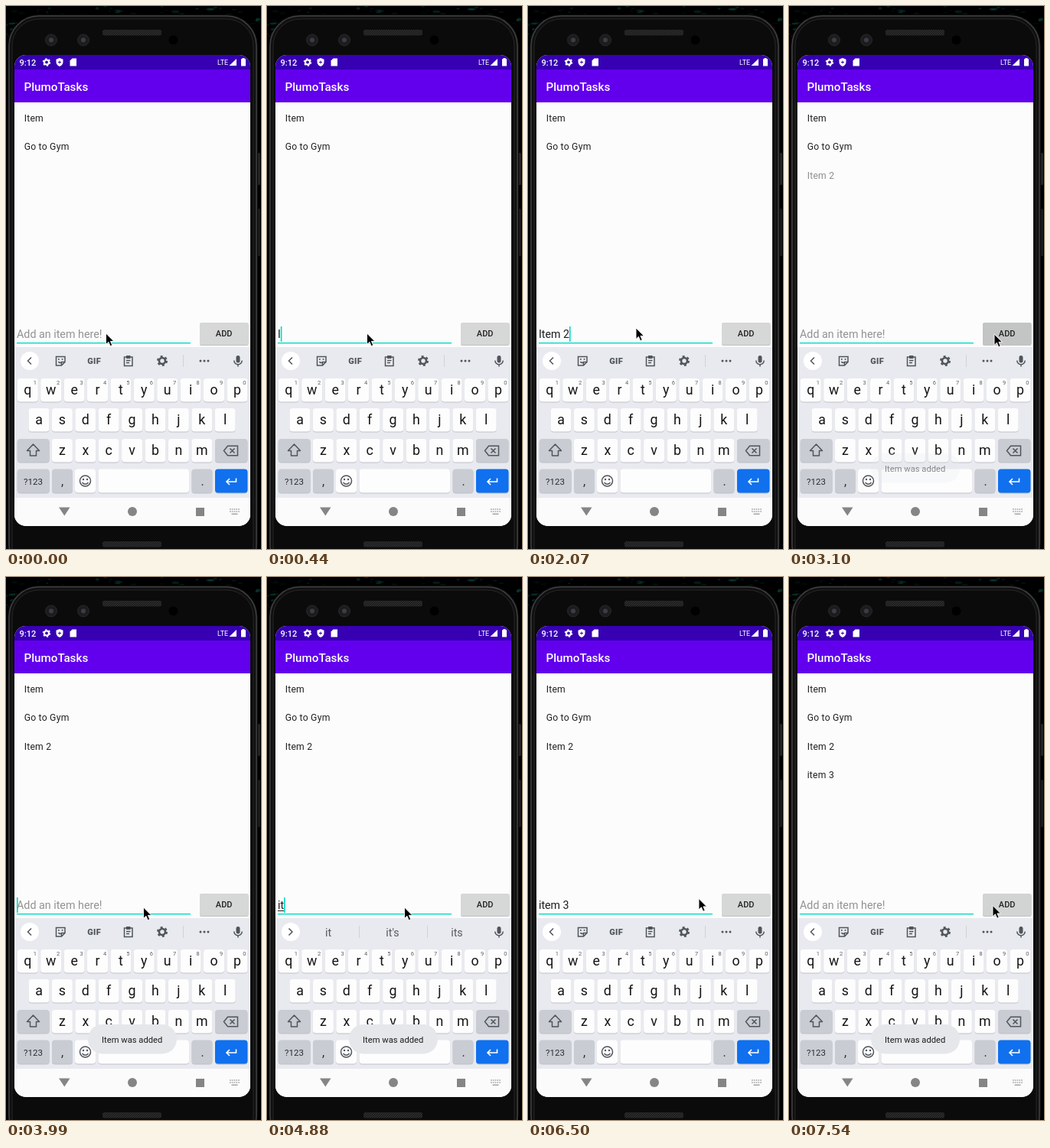
Animation of 333 by 710 pixels, one loop 7.99 s. Source, as an HTML page:

```html
<!DOCTYPE html>
<html lang="en">
<head>
<meta charset="utf-8">
<title>To-do list demo</title>
<style>
  html, body { margin: 0; width: 100%; height: 100%; overflow: hidden; background: #000; }
  svg { display: block; width: 333px; height: 710px; font-family: Roboto, sans-serif; }
  text { white-space: pre; }
  .mid { text-anchor: middle; }
  .medium { font-weight: 500; }
  .icon { fill: none; stroke: #50555b; stroke-width: 1.5; }
  .solid { fill: #50555b; }
  .white { fill: #fff; }
</style>
</head>
<body>
<svg viewBox="0 0 333 710">
  <defs>
    <clipPath id="screen"><rect x="11" y="64" width="308" height="616" rx="15"/></clipPath>
    <pattern id="mesh" width="3" height="3" patternUnits="userSpaceOnUse">
      <rect width="3" height="3" fill="#2b2b2b"/><path d="M0 3L3 0" stroke="#171717"/>
    </pattern>
  </defs>
  <rect width="333" height="710"/>
  <g id="specks"></g>

  <!-- phone body -->
  <rect x="328" y="192" width="4" height="42" rx="1.5" fill="#242424"/>
  <rect x="328" y="265" width="4" height="62" rx="1.5" fill="#1b1b1b"/>
  <rect x="2" y="11" width="327" height="730" rx="41" fill="#0a0a0a"/>
  <rect x="4" y="13" width="323" height="730" rx="39" fill="#101010" stroke="#414141" stroke-width="1.5"/>
  <rect x="8" y="17" width="315" height="730" rx="35" fill="#0b0b0b" stroke="#272727"/>
  <rect x="126" y="31" width="77" height="7.5" rx="2.5" fill="url(#mesh)"/>
  <rect x="126" y="700" width="77" height="7.5" rx="2.5" fill="url(#mesh)"/>
  <g fill="#1c1c1e" stroke="#29292b">
    <circle cx="59" cy="44.5" r="7.5"/><circle cx="101" cy="44.5" r="7.5"/>
  </g>
  <g fill="#3c3d42">
    <circle cx="59" cy="44.5" r="3"/><circle cx="101" cy="44.5" r="3"/>
  </g>
  <circle cx="218.5" cy="44.5" r="6"/>

  <g clip-path="url(#screen)">
    <rect x="11" y="64" width="308" height="616" fill="#fcfcfc"/>
    <rect x="11" y="64" width="308" height="19" fill="#3700b3"/>
    <rect x="11" y="83" width="308" height="43" fill="#6200ee"/>

    <!-- status bar -->
    <g class="white">
      <text class="medium" x="17.5" y="77.5" font-size="11">9:12</text>
      <circle cx="53" cy="73.5" r="3" fill="none" stroke="#fff" stroke-width="2.2"/>
      <circle cx="53" cy="73.5" r="4.5" fill="none" stroke="#fff" stroke-width="1.5" stroke-dasharray="2.3 2.412"/>
      <path d="M70 68l4.5 1.8v3.2q0 4-4.5 6q-4.5-2-4.5-6v-3.2z"/>
      <path d="M86.5 68.5h5.5v10h-8.5v-7z"/>
      <text x="276" y="77" font-size="9">LTE</text>
      <path d="M301 69v9h-9.5z"/>
      <path d="M308.5 68h3v1.2h1.5v9.3h-6v-9.3h1.5z"/>
      <text class="medium" x="23.5" y="111" font-size="15.2">PlumoTasks</text>
    </g>
    <path d="M70 71.5v4M68 73.5h4" stroke="#3700b3"/>

    <g id="list" font-size="12.2" letter-spacing=".22" fill="#222"></g>

    <!-- input row -->
    <rect x="14" y="440" width="227" height="1.4" fill="#03dac5"/>
    <text id="hint" x="14" y="434" font-size="14.3" fill="#929292">Add an item here!</text>
    <text id="field" x="14" y="434" font-size="14.2" fill="#1c1c1c"></text>
    <rect id="under" x="14" y="436" height="1" fill="#222"/>
    <rect id="caret" y="419" width="1.6" height="20" fill="#03dac5"/>
    <rect x="253" y="415" width="63.5" height="29" rx="2" fill="#bfc0c0"/>
    <rect x="253" y="414" width="63.5" height="29" rx="2" fill="#d6d7d7"/>
    <rect id="ripple" x="253" y="414" width="63.5" height="29" rx="2"/>
    <text class="mid medium" x="284.7" y="432.3" font-size="11" fill="#222">ADD</text>

    <!-- keyboard -->
    <rect x="11" y="446" width="308" height="197" fill="#e8eaef"/>
    <circle cx="31" cy="464" r="12" class="white"/>
    <path id="chevron" class="icon"/>
    <g id="tools">
      <path class="icon" d="M65.5 458.5h11.5v7l-4.5 4.500h-7zM77 465.5h-4.5v4.5M68.5 465q1.5 2.5 4 1"/>
      <path class="solid" d="M68 461h1.7v1.7h-1.7zM72.7 461h1.7v1.7h-1.7z"/>
      <text class="mid solid" x="115.2" y="468" font-size="11" font-weight="900" letter-spacing=".4">GIF</text>
      <path class="icon" d="M154.5 459h10.5v11.5h-10.5zM157 463.5h5.5M157 466.5h4"/>
      <path class="solid" d="M157 457h5.5v4h-5.5z"/>
      <circle class="icon" cx="204" cy="464" r="4" style="stroke-width:2.6"/>
      <circle class="icon" cx="204" cy="464" r="6" stroke-dasharray="3 3.283" style="stroke-width:2"/>
      <path d="M231.5 456v16" stroke="#cfd2d7"/>
      <g class="solid"><circle cx="254" cy="464" r="1.5"/><circle cx="259" cy="464" r="1.5"/><circle cx="264" cy="464" r="1.5"/></g>
    </g>
    <g id="words" class="mid" font-size="14.2" fill="#55595f">
      <path d="M120.5 456v16M209.5 456v16" stroke="#cfd2d7"/>
      <text x="80" y="469.5"></text><text x="164" y="469.5"></text><text x="248" y="469.5"></text>
    </g>
    <rect class="solid" x="300.5" y="457" width="5" height="9.5" rx="2.5"/>
    <path class="icon" d="M297.8 463.5a5.2 5.2 0 0 0 10.4 0M303 468.5v3"/>
    <g id="keys"></g>
    <path id="shift" class="icon" d="M35.5 573l8 8.5h-4v6.5h-8v-6.5h-4z" stroke-linejoin="round"/>
    <path class="icon" d="M284.5 581.5l5-6.2h13v12.4h-13zM292.500 578.5l6 6m0-6l-6 6"/>
    <g fill="#2b2d31" class="mid">
      <text x="35.5" y="626" font-size="11.5">?123</text>
      <text x="73.5" y="627" font-size="16">,</text>
      <text x="256.5" y="627" font-size="16">.</text>
    </g>
    <circle class="icon" cx="103.5" cy="621" r="7"/>
    <path class="icon" d="M99.5 623q4 4.500 8 0"/>
    <g class="solid"><circle cx="101" cy="619" r="1.2"/><circle cx="106" cy="619" r="1.2"/></g>
    <path d="M300.5 617.5v4.5h-12.5m4-4l-4 4l4 4" fill="none" stroke="#fff" stroke-width="1.6"/>

    <!-- navigation bar -->
    <rect x="11" y="643" width="308" height="38" fill="#fbfbfb"/>
    <g fill="#858585">
      <path d="M69 655.5h14.5l-7.2 11z"/>
      <circle cx="165" cy="661" r="6"/>
      <rect x="248" y="656" width="11" height="11"/>
    </g>
    <path d="M292 658h13M292 661h13" stroke="#a5a5a5" stroke-width="1.6" stroke-dasharray="1.7 1.1"/>
    <path d="M294.5 664.2h8" stroke="#a5a5a5" stroke-width="1.5"/>

    <g id="toast">
      <rect id="bubble" x="107" y="585" width="116" height="38.5" rx="19" fill="#e6e7ea"/>
      <text class="mid" x="164.7" y="609" font-size="11.2" fill="#1c1c1c">Item was added</text>
    </g>
  </g>
  <path id="mouse" d="M0 0v14.5l3.4-3.2l2.3 5.4l2.5-1.1l-2.3-5.2h4.5z" stroke="#fff" stroke-width=".9"/>
</svg>
<script>
const $ = id => document.getElementById(id);
const TICK = 147.96, LOOP = 7990;

function add(parent, tag, attrs, text = '') {
  const el = document.createElementNS('http://www.w3.org/2000/svg', tag);
  for (const name in attrs) el.setAttribute(name, attrs[name]);
  el.textContent = text;
  return parent.appendChild(el);
}
const set = (id, name, value) => $(id).setAttribute(name, value);

// dim desktop behind the phone
let seed = 7;
const rnd = () => (seed = seed * 16807 % 2147483647) / 2147483647;
for (let i = 0; i < 160; i++)
  add($('specks'), 'ellipse', {
    cx: rnd() * 333, cy: rnd() * 40, rx: 1 + rnd() * 4, ry: .5 + rnd() * 1.5,
    fill: '#0b4a40', opacity: rnd() * .6
  });

const rows = ['Item', 'Go to Gym', 'Item 2', 'item 3'].map((name, i) =>
  add($('list'), 'text', { x: 23.7, y: 150.5 + i * 37.5 }, name));

// keys
function key(x, y, w, h, fill = '#fdfdfe') {
  add($('keys'), 'rect', { x, y: y + 1, width: w, height: h, rx: 4, fill: '#bfc2c8' });
  add($('keys'), 'rect', { x, y, width: w, height: h, rx: 4, fill });
}
const letters = [];
[['qwertyuiop', 28.3, 487], ['asdfghjkl', 43, 526], ['zxcvbnm', 73.4, 566]].forEach(([chars, x0, y]) =>
  [...chars].forEach((ch, i) => {
    const x = x0 + i * 30.4;
    key(x - 13.5, y, 27, 30.5);
    letters.push(add($('keys'), 'text', { class: 'mid', x, y: y + 21, 'font-size': 17.8, fill: '#151515' }, ch));
    if (y < 500)
      add($('keys'), 'text', { class: 'mid', x: x + 9.5, y: y + 8.3, 'font-size': 7.5, fill: '#5a5e64' }, (i + 1) % 10);
  }));
const GREY = '#c9ccd3';
key(14.7, 566, 42, 30.5, GREY);
key(273, 566, 42.5, 30.5, GREY);
[[14.7, 42, GREY], [60, 27, GREY], [90, 27], [120.5, 118.5], [242.5, 27, GREY], [273, 42.5, '#1070ee']]
  .forEach(([x, w, fill]) => key(x, 605.5, w, 31, fill));

// tracks: [tick, value], held until the next entry
const typed = [[0, ''], [3, 'I'], [5, 'It'], [6, 'Ite'], [8, 'Item'], [10, 'Item '], [12, 'Item 2'], [21, ''],
  [31, 'i'], [33, 'it'], [35, 'ite'], [37, 'item'], [39, 'item '], [40, 'item 3'], [50, '']];
const composing = [[0, 0], [4, 1], [5, 2], [7, 3], [9, 4], [12, 0], [32, 1], [33, 2], [35, 3], [38, 4], [40, 0]];
const suggested = [[0, ''], [4, "I I'm It"], [6, "It It's Its"], [7, 'Ite Item Its'], [9, 'is of number'], [12, ''],
  [32, 'I i in'], [33, "it it's its"], [36, "ite item it's"], [38, 'item items number'], [40, '3 3rd 30'], [42, '']];
const caretOn = [[0, 0], [3, 1], [16, 0], [19, 1], [21, 0], [23, 1], [25, 0], [27, 1], [44, 0], [46, 1], [50, 0]];
const listed = [[0, 2], [21, 2.5], [22, 3], [50, 3.5], [51, 4]];
const toast = [[0, 0], [21, .5], [22, 1], [36, .6], [37, .2], [38, 0], [50, .5], [51, 1]];
const press = [[0, 0], [19, .06], [20, .12], [21, .09], [22, .06], [23, .03], [24, 0], [48, .06], [49, .12], [50, .08], [51, .02]];
const caps = [[0, 0], [2, 1], [3, 0]];
const mouse = [[0, 130.5, 428], [13, 130.5, 428], [14, 141, 421], [18, 268, 429], [22, 268, 429],
  [27, 179.5, 432], [43, 179.5, 432], [44, 223, 420.5], [48, 266, 429.5], [54, 266, 429.5]];

const at = (track, tick) => track.findLast(([start]) => start <= tick)[1];

function mouseAt(tick) {
  const i = mouse.findIndex(point => point[0] > tick);
  const [t0, x0, y0] = mouse[i - 1], [t1, x1, y1] = mouse[i];
  const k = (tick - t0) / (t1 - t0);
  return [x0 + (x1 - x0) * k, y0 + (y1 - y0) * k];
}

function draw(tick) {
  const text = at(typed, tick), words = at(suggested, tick), upper = at(caps, tick);
  const field = $('field');
  field.textContent = text;
  set('hint', 'opacity', text ? 0 : 1);
  set('caret', 'x', 14 + (text ? field.getComputedTextLength() : 0));
  set('caret', 'opacity', at(caretOn, tick));
  const count = Math.min(at(composing, tick), text.length);
  set('under', 'width', count ? field.getSubStringLength(0, count) : 0);

  set('tools', 'opacity', words ? 0 : 1);
  set('words', 'opacity', words ? 1 : 0);
  const parts = words.split(' ');
  $('words').querySelectorAll('text').forEach((el, i) => el.textContent = parts[i] || '');
  set('chevron', 'd', words ? 'M28.5 459.5l4.5 4.5l-4.5 4.5' : 'M33 459.5l-4.5 4.5l4.5 4.5');

  letters.forEach(el => {
    const ch = el.textContent;
    el.textContent = upper ? ch.toUpperCase() : ch.toLowerCase();
  });
  $('shift').style.fill = upper ? '#50555b' : 'none';

  const shown = at(listed, tick);
  rows.forEach((row, i) => row.setAttribute('opacity', Math.max(0, Math.min(1, shown - i))));
  const fade = at(toast, tick);
  set('toast', 'opacity', fade);
  set('bubble', 'opacity', fade);
  set('ripple', 'opacity', at(press, tick));
  set('mouse', 'transform', `translate(${mouseAt(tick)})`);
}

function frame() {
  const time = performance.now() % LOOP;
  draw(Math.min(53, Math.floor((time + 13) / TICK)));
  requestAnimationFrame(frame);
}
frame();
</script>
</body>
</html>
```
